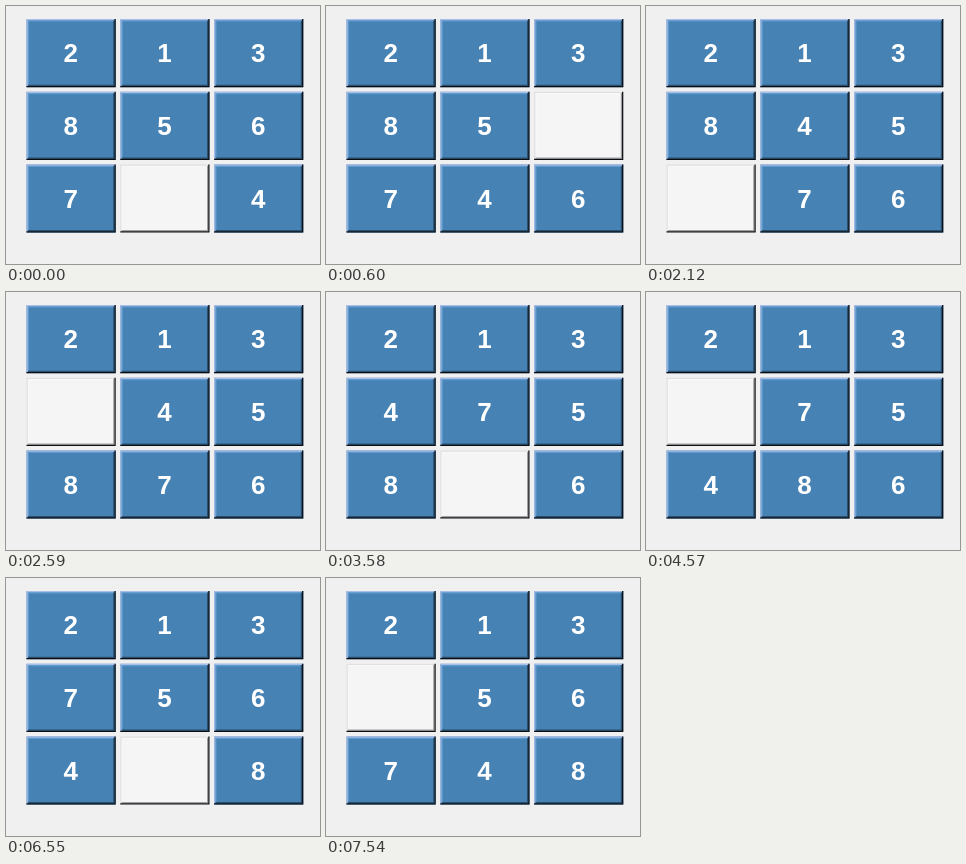
Animation of 314 by 258 pixels, one loop 8 s. Source, as an HTML page:

```html
<!DOCTYPE html>
<html lang="en">
<head>
<meta charset="utf-8">
<title>Sliding puzzle</title>
<style>
html, body { margin: 0; width: 100%; height: 100%; overflow: hidden; background: #f0f0f0; }
svg { display: block; width: 100vw; height: 100vh; }
text { font: bold 26px "Liberation Sans", Arial, sans-serif; fill: #fff; text-anchor: middle; }
</style>
</head>
<body>
<svg id="stage" viewBox="0 0 314 258"></svg>
<script>
const NS = "http://www.w3.org/2000/svg";
const LOOP = 8000;
const START = [2, 1, 3, 8, 5, 6, 7, 0, 4];
// [time in ms, cell the gap moves to]
const MOVES = [
  [130, 8], [600, 5], [1130, 4], [1590, 7], [2120, 6], [2590, 3],
  [3120, 4], [3580, 7], [4110, 6], [4570, 3], [5100, 4], [5560, 5],
  [6090, 8], [6550, 7], [7080, 6], [7540, 3]
];
const W = 89.2, H = 68.1, EDGE = 1.25;
const TILE = { face: "#4682b4", light: "#a9bde6", glow: "#5c9bd0", shade: "#2a4e6c" };
const GAP = { face: "#f5f5f5", light: "#e0e0e0", glow: "#f8f8f8", shade: "#a0a0a0" };

function add(parent, tag, attrs) {
  const el = document.createElementNS(NS, tag);
  for (const key in attrs) el.setAttribute(key, attrs[key]);
  return parent.appendChild(el);
}

// L-shaped bevel strips, inset by d
const topLeft = d =>
  `M${d} ${H - d}V${d}H${W - d}v${EDGE}H${d + EDGE}V${H - d}z`;
const bottomRight = d =>
  `M${d} ${H - d}H${W - d}V${d}h${-EDGE}V${H - d - EDGE}H${d}z`;

function makeCell(i) {
  const x = 20.5 + (i % 3) * 93.8;
  const y = 13.1 + Math.floor(i / 3) * 72.7;
  const g = add(stage, "g", { transform: `translate(${x} ${y})` });
  const cell = {
    face: add(g, "rect", { width: W, height: H }),
    glow: add(g, "path", { d: topLeft(EDGE) }),
    shade: add(g, "path", { d: bottomRight(EDGE) }),
    light: add(g, "path", { d: topLeft(0) })
  };
  add(g, "path", { d: bottomRight(0), fill: "#0a0d12" });
  cell.label = add(g, "text", { x: 44.2, y: 43.2 });
  return cell;
}

const stage = document.getElementById("stage");
const cells = START.map((_, i) => makeCell(i));

function boardAt(t) {
  const board = START.slice();
  let gap = board.indexOf(0);
  for (const [time, to] of MOVES) {
    if (t < time) break;
    board[gap] = board[to];
    board[to] = 0;
    gap = to;
  }
  return board;
}

let shown = "";
function draw(t) {
  const board = boardAt(t);
  if (board.join() === shown) return;
  shown = board.join();
  board.forEach((n, i) => {
    const skin = n ? TILE : GAP;
    for (const part in skin) cells[i][part].setAttribute("fill", skin[part]);
    cells[i].label.textContent = n || "";
  });
}

const begin = performance.now();
function tick() {
  draw((performance.now() - begin) % LOOP);
  requestAnimationFrame(tick);
}
tick();
</script>
</body>
</html>
```
